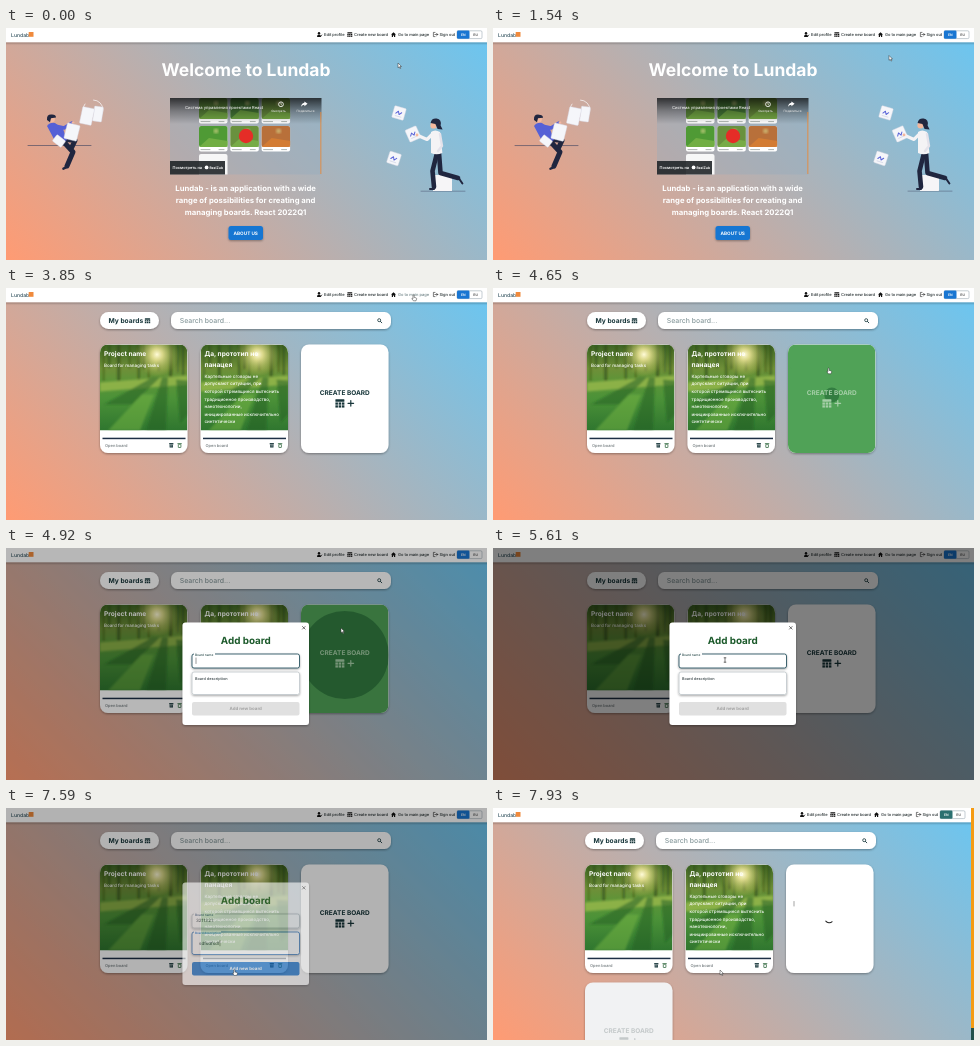
These frames come from a looping animation (481 px wide and 232 px high, 7990 ms). An HTML page:

```html
<!DOCTYPE html>
<html lang="en">
<head>
<meta charset="utf-8">
<title>Board app demo</title>
<style>
  html, body { margin: 0; width: 100%; height: 100%; overflow: hidden; }
  svg { display: block; width: 100vw; height: 100vh; }
  text { font-family: Inter, "Open Sans", sans-serif; text-rendering: geometricPrecision; white-space: pre; }
</style>
</head>
<body>
<svg id="stage" viewBox="0 0 481 232" preserveAspectRatio="none" xmlns="http://www.w3.org/2000/svg"></svg>
<script>
const LOOP = 7990;
const BRAND = 'Lundab';
const INK = '#17363a', NAVY = '#20263f', BLUE = '#1976d2', GREEN = '#1c5a2b';

// Markup helpers
const rect = (x, y, w, h, fill, r = 0, more = '') =>
  `<rect x="${x}" y="${y}" width="${w}" height="${h}" rx="${r}" fill="${fill}" ${more}/>`;
const path = (d, fill, more = '') => `<path d="${d}" fill="${fill}" ${more}/>`;
const line = (d, color, w = 1, more = '') =>
  path(d, 'none', `stroke="${color}" stroke-width="${w}" stroke-linecap="round" stroke-linejoin="round" ${more}`);
const dot = (x, y, r, fill, more = '') => `<circle cx="${x}" cy="${y}" r="${r}" fill="${fill}" ${more}/>`;
const text = (x, y, size, s, fill = INK, weight = 500, more = '') =>
  `<text x="${x}" y="${y}" font-size="${size}" fill="${fill}" font-weight="${weight}" ${more}>${s}</text>`;
const MID = 'text-anchor="middle"';
const group = (body, id = '', more = '') => `<g ${id && `id="${id}"`} ${more}>${body}</g>`;
const move = (x, y, body, turn = 0) => group(body, '', `transform="translate(${x} ${y}) rotate(${turn})"`);

const stops = list => list.map(([o, c, a = 1]) =>
  `<stop offset="${o}" stop-color="${c}" stop-opacity="${a}"/>`).join('');

const defs = `<defs>
  <linearGradient id="sky" gradientUnits="userSpaceOnUse" x1="62.25" y1="294.25" x2="418.75" y2="-62.25">
    ${stops([[0, '#ff9b73'], [1, '#69c6f2']])}</linearGradient>
  <linearGradient id="wood" x1="0" y1="0" x2="0" y2="1">
    ${stops([[0, '#3d6424'], [.28, '#6f8f38'], [.42, '#5d9438'], [.62, '#4c9238'], [1, '#2f762f']])}</linearGradient>
  <radialGradient id="sun">${stops([[0, '#fffbd8'], [.25, '#f2e99a', .85], [1, '#b8c050', 0]])}</radialGradient>
  <linearGradient id="shade" x1="0" y1="0" x2="0" y2="1">
    ${stops([[0, '#000', .72], [.5, '#000', .3], [1, '#000', 0]])}</linearGradient>
  <filter id="soft" x="-20%" y="-20%" width="140%" height="150%">
    <feDropShadow dx="0" dy="1" stdDeviation="1" flood-opacity=".35"/></filter>
  <filter id="blur"><feGaussianBlur stdDeviation="1"/></filter>
  <clipPath id="cardClip"><rect width="87.5" height="108.5" rx="8"/></clipPath>
  <clipPath id="pageClip"><rect width="87.5" height="86"/></clipPath>
  <clipPath id="videoClip"><rect x="164" y="70" width="151.5" height="76.5"/></clipPath>
</defs>`;

// Small icons, drawn around their own top left corner
const table = (x, y, s, c) => move(x, y,
  rect(0, 0, s, s * .28, c, .5) +
  [0, 1, 2].map(i => rect(i * s * .36, s * .36, s * .28, s * .25, c) +
    rect(i * s * .36, s * .68, s * .28, s * .25, c)).join(''));
const person = (x, y) => dot(x + 2, y + 1.2, 1.2, '#111') +
  path(`M${x} ${y + 5}q0-2.4 2-2.4t2 2.4z`, '#111') + line(`M${x + 3.6} ${y + 4.6}l1.2-1.6`, '#111', .7);
const house = (x, y) => path(`M${x} ${y + 2.6}l2.5-2.4 2.5 2.4h-.8v2.4h-1.2v-1.6h-1v1.6h-1.2v-2.4z`, '#111');
const exit = (x, y) => line(`M${x + 2} ${y + .4}h-1.6v4.2h1.6M${x + 1.8} ${y + 2.5}h3m-1.2-1.2l1.2 1.2-1.2 1.2`, '#222', .6);
const archive = (x, y) => rect(x, y, 4.2, 1.3, INK) + rect(x + .4, y + 1.6, 3.4, 2.8, INK) +
  line(`M${x + 1.2} ${y + 2.8}h1.8`, '#fff', .5);
const trash = (x, y) => line(`M${x} ${y + .5}h3.6`, GREEN, .7) +
  rect(x + .5, y + 1.2, 2.6, 3.2, '#fff', .3, `stroke="${GREEN}" stroke-width=".7"`);

function header() {
  const nav = [[318, 'Edit profile'], [348, 'Create new board'], [392, 'Go to main page'], [433.5, 'Sign out']];
  return rect(-2, -3, 485, 17.2, '#fff', 0, 'filter="url(#soft)"') +
    text(5, 9, 5.1, BRAND, '#30505c') + rect(22.7, 4, 4.8, 4.8, '#f08a3c') +
    group(person(311, 4) + table(341.3, 4.2, 5, '#111') + house(385, 4) + exit(427, 4) +
      nav.map(([x, s], i) => text(x, 8.2, 4, s, '#1c2628', 500, `id="nav${i}"`)).join('') +
      rect(451, 2.8, 25, 7.8, '#fff', 1.2, 'stroke="#8a9aa5" stroke-width=".5"') +
      rect(451, 2.6, 12.5, 8.2, BLUE, 1.2, 'id="lang"') +
      text(457.2, 8, 3.4, 'EN', '#fff', 600, MID) + text(469.7, 8, 3.4, 'RU', '#333', 500, MID), 'nav');
}

// Sheet of paper with a scribble
const sheet = (x, y, w, h, turn, mark = '') => move(x, y,
  rect(-w / 2, -h / 2, w, h, '#f5f6fa', 1, 'stroke="#d5d6e2" stroke-width=".4"') +
  (mark && line(`M${-w / 4} 1l2-2.5 1.5 3 2-2.5`, mark, 1) + line(`M${-w / 4} 3.5h${w / 2}`, '#c3c6dd', .5)), turn);

function man() {
  return line('M22 117.5H85', '#39415f', .6) +
    dot(87, 82, 10, 'none', 'stroke="#eee4e2" stroke-width="1" stroke-dasharray="38 9"') +
    sheet(92, 86, 9, 15, 8) + sheet(81, 88, 12, 17, 12) +
    line('M57 111L69 112.5 65 121M56 112L67 124 61 138', NAVY, 5) +
    line('M60 139.5l-2.6 1.2', NAVY, 2.4) +
    line('M65 121l2 3', NAVY, 2.6) +
    path('M41 98q3-4 8-3l8 6 4 11q-6 4-12 1z', '#5560d6') +
    line('M49 98l9 2 8-5', '#5560d6', 3.6) + dot(67, 94.6, 1.4, '#f3b79d') +
    sheet(66, 104, 13, 16, 14) + sheet(53, 113, 11, 8, 38) +
    dot(45.6, 91.2, 3.2, '#f3b79d') +
    path('M41 92q-.5-6 5-5.4 4 0 4 3l-5 .6-1 4z', NAVY);
}

function woman() {
  return line('M415 163.2H459', '#46506c', .5) +
    sheet(393, 85, 12, 12, 16, '#5963d8') + sheet(407, 106, 12, 13, -24, '#5963d8') +
    sheet(388, 130.5, 12, 12, 18, '#5963d8') +
    rect(427, 147, 19, 16, '#f6f5f7', .6) +
    line('M431 125L426.5 143 428 159', NAVY, 4.6) + line('M433 125L434.5 145 452 150', NAVY, 4.6) +
    line('M428 161h-4M453 150.5l3.4 5', NAVY, 2) +
    path('M425 104q4-3 9 0l2.4 21q-6 2.6-11.4 0z', '#f4f3f5') +
    line('M427 105.5l-6 6-9-4', '#f4f3f5', 3.2) + dot(411, 107, 1.4, '#f3b79d') +
    line('M434 106l2 12-4 5', '#e4e2ea', 2.4) +
    dot(427.6, 97.4, 3.2, '#f3b79d') +
    path('M424.6 95q1-5 6-4.4 5.4 1 4 7l2 4-5-.6-2.2-5z', NAVY);
}

function video() {
  const tints = ['#5d8a3c', '#477c38', '#6a8f3e', '#4f9a35', '#69913e', '#b8703a'];
  let cards = '';
  tints.forEach((c, i) => {
    const x = 193 + i % 3 * 31.3, y = 70 + Math.floor(i / 3) * 28;
    cards += rect(x, y, 28.5, 25.5, '#fff', 2) + rect(x, y, 28.5, 21, c, 2) +
      path(`M${x} ${y + 21}l10-9 18.5 3v6z`, i > 4 ? '#dd8030' : '#7db548', 'opacity=".75"') +
      dot(x + 17, y + 5, 2.5, '#d7d58a', 'opacity=".6" filter="url(#blur)"') +
      line(`M${x + 2} ${y + 23.6}h9m9 0h5`, '#8c9690', .7);
  });
  return group(rect(164, 70, 152, 77, 'url(#sky)') + rect(164, 70, 152, 77, '#8fa9bd', 0, 'opacity=".35"') +
    cards + rect(193, 126, 28.5, 24, '#f7f7f7', 2) +
    rect(164, 70, 152, 26, 'url(#shade)') +
    text(179, 80.5, 4.1, 'Система управления проектами React', '#eee', 500) +
    dot(275, 76.3, 2.4, 'none', 'stroke="#fff" stroke-width=".8"') + line('M275 75v1.5l1 .6', '#fff', .6) +
    path('M301.6 75.8l-3.2-2.4v1.4q-3 .5-3.3 4 1.200-2 3.300-2v1.500z', '#fff') +
    text(272.5, 84.3, 3, 'Смотреть', '#e5e5e5', 500, MID) + text(299.5, 84.3, 3, 'Поделиться', '#e5e5e5', 500, MID) +
    rect(164, 133, 55, 14, '#22262a', 0, 'opacity=".9"') +
    text(166.5, 140.8, 3.9, 'Посмотреть на', '#fff', 600) + dot(200.6, 139.4, 1.9, '#fff') +
    text(203.4, 140.8, 3.4, 'ReelZub', '#fff', 700) +
    rect(314.4, 84, 1.2, 62, '#e98a3a'), '', 'clip-path="url(#videoClip)"') +
    dot(240, 108, 7.2, '#e52d27');
}

function welcome() {
  const lines = [`${BRAND} - is an application with a wide`, 'range of possibilities for creating and',
    'managing boards. React 2022Q1'];
  return group(man(), 'man') + group(woman(), 'woman') +
    text(240, 48.2, 17.5, `Welcome to ${BRAND}`, '#fff', 700, MID) + video() +
    lines.map((s, i) => text(239.6, 163 + i * 12, 7.7, s, '#fff', 700, MID)).join('') +
    rect(222.5, 198, 34.5, 14, BLUE, 2.5, 'filter="url(#soft)"') +
    text(239.7, 206.8, 4.7, 'ABOUT US', '#fff', 700, MID);
}

function forest() {
  let trunks = '';
  for (let i = 0; i < 11; i++) {
    const x = 3 + i * 8 + 3 * Math.sin(i * 5);
    trunks += rect(x, 0, 1.2 + i % 3 * .8, 30 + 7 * Math.cos(i * 3), '#2b4518', 0, 'opacity=".65"');
  }
  return group(rect(0, 0, 87.5, 86, 'url(#wood)') +
    group(trunks +
      path('M0 38L88 31V40L0 47Z', '#9cbb4c', 'opacity=".75"') +
      path('M52 33L4 60H32L60 33ZM62 33L46 86H66L68 33ZM76 35L80 78 88 70V36Z', '#1f5c26', 'opacity=".5"') +
      path('M42 50L8 86H40L54 50Z', '#76b544', 'opacity=".5"'), '', 'filter="url(#blur)"') +
    dot(57, 10, 22, 'url(#sun)'), '', 'clip-path="url(#pageClip)"');
}

function boardCard(x, title, note) {
  return move(x, 56.5,
    rect(0, 0, 87.5, 108.5, '#fff', 8, 'filter="url(#soft)"') +
    group(forest(), '', 'clip-path="url(#cardClip)"') +
    title.map((s, i) => text(4, 11.6 + i * 11, 6.6, s, '#fff', 700)).join('') +
    note.map((s, i) => text(4, 11 * title.length + 11.3 + i * 7.6, 4.5, s, '#fff', 500)).join('') +
    rect(2.5, 93.2, 83, 1.5, '#1d2f45') + text(5, 102.2, 4, 'Open board', '#6b7477', 500) +
    archive(69.2, 98.6) + trash(77.8, 98.6));
}

const createLabel = (c, id) => group(text(43.8, 50.4, 6.5, 'CREATE BOARD', c, 700, MID) +
  table(34.4, 54.7, 9, c) + line('M47 58.800h5.600M49.800 56v5.600', c, 1.200), id);

function boards() {
  return group(
    rect(94, 24, 59, 17, '#fff', 8.5, 'filter="url(#soft)"') +
    text(102.5, 35, 6.7, 'My boards', INK, 700) + table(138.8, 30.2, 5.4, INK) +
    rect(165, 24, 220, 17, '#fff', 6.5, 'filter="url(#soft)"') +
    text(173.8, 35, 6.9, 'Search board...', '#86989b', 500) +
    dot(373.2, 32.2, 1.5, 'none', `stroke="${INK}" stroke-width=".8"`) + line('M374.400 33.400l1.400 1.400', INK, .9) +
    group(boardCard(94, ['Project name'], ['Board for managing tasks']) +
      boardCard(194.500, ['Да, прототип не', 'панацея'], ['Картельные сговоры не', 'допускают ситуации, при',
        'которой стремящиеся вытеснить', 'традиционное производство,', 'нанотехнологии,',
        'инициированные исключительно', 'синтетически']) +
      move(295, 56.5, rect(0, 0, 87.5, 108.5, '#fff', 8, 'filter="url(#soft)"') +
        group(rect(0, 0, 87.5, 108.5, '#50a257', 0, 'id="hover"') +
          dot(43.8, 50.5, 0, '#0b4a22', 'id="ripple" opacity=".42"'), '', 'clip-path="url(#cardClip)"') +
        createLabel(INK, 'createA') + createLabel('#a6cfa8', 'createB') +
        line('M46.200 57.200a4.500 4.500 0 0 1-6.400-.6', '#222', 1, 'id="spin"') +
        line('M8 37v4.500', '#444', .5, 'id="bar"')), 'cards') +
    move(94, 174.500, group(rect(0, 0, 87.5, 108.500, '#f1f2f3', 8, 'filter="url(#soft)"') +
      createLabel('#c4c9ca'), 'next')), 'content');
}

function modal() {
  const box = (y, h, id) => rect(186, y, 107.5, h, '#fff', 2, `id="${id}" filter="url(#soft)" stroke-width=".9"`);
  return rect(0, 0, 481, 232, '#000', 0, 'id="dim"') +
    group(rect(176.5, 74.5, 126.5, 102.5, '#fff', 3, 'filter="url(#soft)"') +
      line('M296.500 78.500l2.600 2.600m0-2.600l-2.600 2.600', '#333', .7) +
      text(239.800, 96, 9.9, 'Add board', GREEN, 700, MID) +
      box(106, 14, 'boxA') + box(124, 22.5, 'boxB') +
      rect(188, 105, 21, 2.4, '#fff') + text(189, 107.6, 3.200, 'Board name', '#35557a', 500, 'id="labelA"') +
      rect(188, 123, 27, 2.4, '#fff', 0, 'id="gapB"') + text(189, 132, 3.8, 'Board description', '#4a5558', 600, 'id="labelB"') +
      text(190, 114.400, 4.500, '', '#465056', 500, 'id="valueA"') +
      text(193, 136.500, 4.500, '', '#465056', 500, 'id="valueB"') +
      line('', '#333', .5, 'id="caret"') +
      rect(186, 154, 107.5, 13.5, BLUE, 2, 'id="submit"') +
      text(239.700, 162.300, 4.4, 'Add new board', '#fff', 700, MID + ' id="submitText"'), 'dialog');
}

function cursors() {
  const edge = 'stroke="#333" stroke-width=".5" stroke-linejoin="round"';
  return group(path('M0 0v4.800l1.200-1 .8 1.800.8-.4-.8-1.700h1.500z', '#fff', edge + ' id="arrow"') +
    path('M0 .4q.7-.7 1.200 0v2l2 .5q.5.300.4 1.200l-.6 1.700h-2.600l-1.600-2.200q.3-.7 1.200.100z', '#fff', edge + ' id="hand"') +
    line('M-.9-2.200h1.800M0-2.200v4.400M-.9 2.200h1.800', '#222', .6, 'id="beam"'), 'pointer');
}

const stage = document.getElementById('stage');
stage.innerHTML = defs + rect(0, 0, 481, 232, 'url(#sky)') +
  group(welcome(), 'welcome') + boards() + header() +
  group(rect(478, 0, 3, 232, '#f59b12') + rect(478, 220, 3, 12, '#24514b'), 'scrollbar') + modal() + cursors();

const el = {};
stage.querySelectorAll('[id]').forEach(n => el[n.id] = n);
const set = (id, name, v) => el[id].setAttribute(name, v);
const show = (id, on) => set(id, 'opacity', +on);
const shift = (id, x, y) => set(id, 'transform', `translate(${x} ${y})`);

const ramp = (t, a, b) => Math.max(0, Math.min(1, (t - a) / (b - a)));
const ease = u => u * u * (3 - 2 * u);

// time, x, y
const route = [
  [0, 392, 35], [1540, 396, 27.5], [2500, 400, 21], [2850, 407, 7], [3900, 407, 7], [4350, 335, 80],
  [4950, 335, 80], [5400, 243, 112], [5470, 243, 112], [5610, 232, 112], [6480, 232, 112], [6630, 214, 134],
  [7100, 214, 134], [7420, 228, 161.500], [LOOP, 227, 162]
];
function place(t) {
  const i = route.findIndex((p, k) => t >= p[0] && t <= route[k + 1][0]);
  const [a, b] = [route[i], route[i + 1]], u = ease(ramp(t, a[0], b[0]));
  return [a[1] + (b[1] - a[1]) * u, a[2] + (b[2] - a[2]) * u];
}

const typed = (s, t, start, step) => s.slice(0, Math.max(0, Math.floor((t - start) / step)));

function draw(t) {
  // Floating figures
  const wave = (1 - Math.cos(t / 1600 * 2 * Math.PI)) / 2;
  shift('man', 0, 4.200 * wave);
  shift('woman', 0, -4.600 * wave);

  // Pages
  const onBoards = t >= 2950, saved = t >= 7650;
  show('welcome', !onBoards);
  show('content', onBoards);
  show('cards', ramp(t, 2950, 3300));
  shift('content', saved ? -2 : 0, 0);
  shift('nav', saved ? -4 : 0, 0);
  set('lang', 'fill', saved ? '#2b7070' : BLUE);
  set('nav2', 'fill', t > 2800 && t < 3950 ? '#6c8084' : '#1c2628');
  show('scrollbar', saved);

  // Create card: hover, ripple, then the loading placeholder
  const hover = ramp(t, 4250, 4390) * (1 - ramp(t, 5050, 5350));
  show('hover', hover);
  set('ripple', 'r', 44 * ramp(t, 4600, 4900));
  set('ripple', 'opacity', t > 4600 ? .42 * (1 - ramp(t, 5000, 5300)) : 0);
  show('createA', saved ? 0 : 1 - hover);
  show('createB', saved ? 0 : hover);
  show('spin', saved);
  show('bar', saved);
  set('spin', 'transform', `rotate(${(t - 7930) * .26} 43.8 53.5)`);
  show('next', ramp(t, 7650, 7900));

  // Dialog
  const closing = 1 - ramp(t, 7520, 7700);
  set('dim', 'opacity', .5 * ramp(t, 4650, 5130) * closing);
  show('dialog', ramp(t, 4650, 4850) * closing);
  const name = typed('3211321', t, 5890, 85), note = typed('sdfsdfsdf', t, 6660, 40), second = t >= 6600;
  el.valueA.textContent = name;
  el.valueB.textContent = note;
  set('boxA', 'stroke', second ? '#b9c1c6' : '#2b5562');
  set('boxB', 'stroke', second ? '#2c6fb4' : '#c5cbcf');
  set('labelA', 'fill', second ? '#35557a' : '#2b4c4c');
  show('gapB', second);
  set('labelB', 'y', second ? 125.600 : 132);
  set('labelB', 'font-size', second ? 3 : 3.8);
  set('labelB', 'fill', second ? BLUE : '#4a5558');
  const field = second ? el.valueB : el.valueA;
  const x = (second ? 193 : 190) + (field.textContent ? field.getComputedTextLength() + .4 : 0);
  set('caret', 'd', `M${x} ${second ? 132.300 : 110}v5.500`);
  show('caret', t < 5300 || t > 5850);
  set('submit', 'fill', name ? BLUE : '#e0e0e0');
  set('submitText', 'fill', name ? '#fff' : '#a3a3a3');

  // Pointer
  shift('pointer', ...place(t));
  const beam = t > 5330 && t < 7200;
  const hand = (t > 2780 && t < 3950) || (t > 4300 && t < 4700) || (t > 7300 && t < 7900);
  show('beam', beam);
  show('hand', hand);
  show('arrow', !beam && !hand);
}

const start = performance.now();
function tick() {
  draw((performance.now() - start) % LOOP);
  requestAnimationFrame(tick);
}
tick();
</script>
</body>
</html>
```
